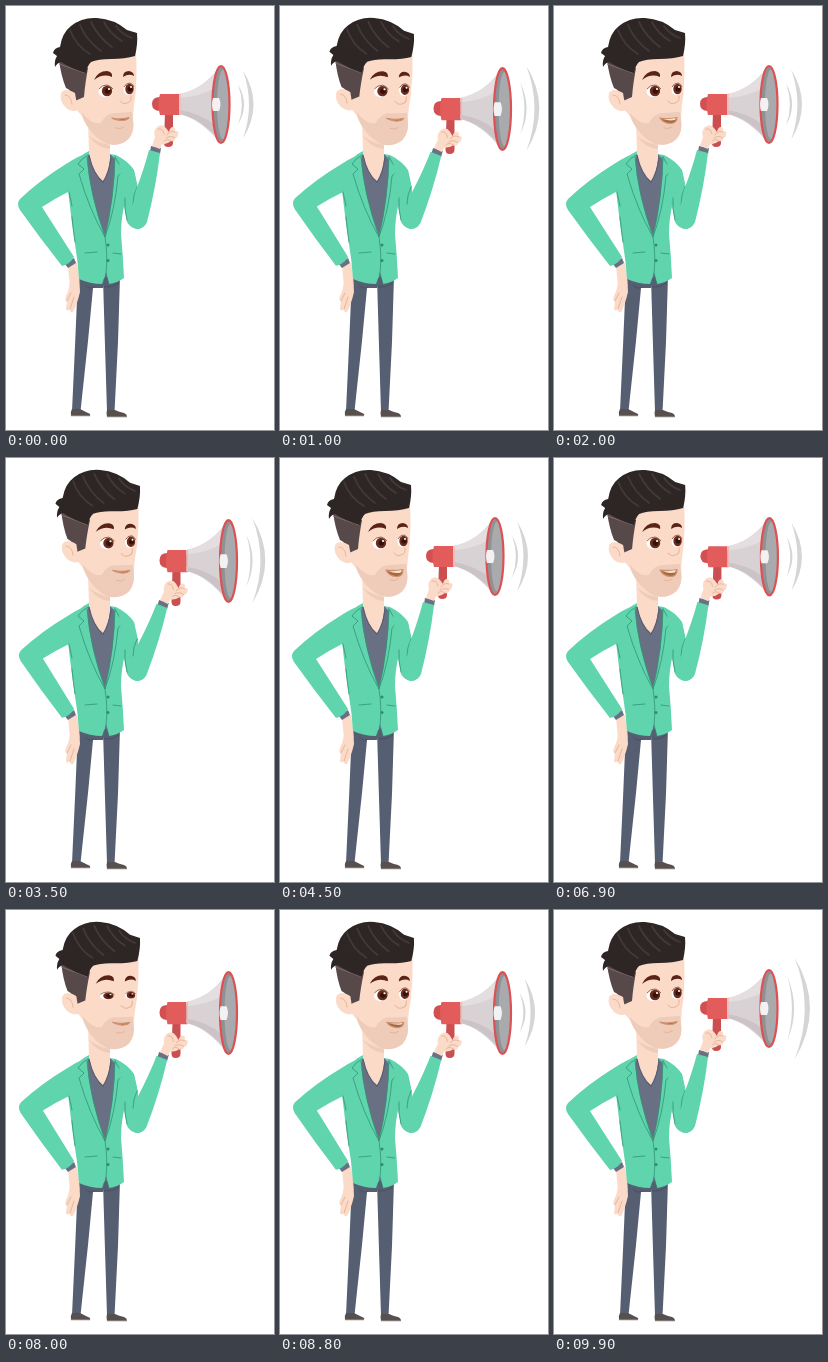
These frames come from a looping animation (268x424 px, 10 s). An HTML page:

```html
<!DOCTYPE html>
<html lang="en">
<head>
<meta charset="utf-8">
<title>Man with a megaphone</title>
<style>
  html, body { margin: 0; height: 100%; overflow: hidden; background: #fff; }
  svg { display: block; width: 100vw; height: 100vh; }
  .skin { fill: #fbdac8; }
  .shade { fill: #efcbb9; }
  .jacket { fill: #5fd4ad; }
  .pants { fill: #565f72; }
  .cuff { fill: #697083; }
  .hair { fill: #2e2525; }
  .red { fill: #e15c5b; }
  .seam { fill: none; stroke: #329576; stroke-width: .8; stroke-linecap: round; stroke-linejoin: round; }
  .fold { fill: none; stroke: #e3ae96; stroke-width: .8; stroke-linecap: round; }
  .strand { fill: none; stroke: #43393a; stroke-width: 1.8; stroke-linecap: round; }
  .brow { fill: #5a2318; }
</style>
</head>
<body>
<svg viewBox="0 0 268 424">
  <!-- legs and shoes -->
  <g class="pants">
    <path d="M72 270L100 272L97 282L87 282L82 335L74.500 405H66L69 340Z"/>
    <path d="M97 272L114 270L112 336L108.500 406H101L99 340Z"/>
  </g>
  <path d="M79 279Q84 284 88 281M98 281Q106 282 113 277" fill="none" stroke="#454d5e" stroke-width=".8"/>
  <g fill="#57504e">
    <path d="M66 403H74Q78 405 82 407Q85 408 84 410H65Q64 406 66 403Z"/>
    <path d="M101 404H109Q113 406 118 407Q121 408 121 411H101Q100 407 101 404Z"/>
  </g>
  <path d="M65 410H84M101 411H121" stroke="#b5b1af" stroke-width=".8"/>

  <!-- hand at the hip -->
  <path class="skin" d="M62 259L71 257Q74 272 74 286Q71 299 67 306Q64 307 64 303Q61 306 60 303L61 295Q58 295 60 290Q65 281 63 271Z"/>
  <path class="fold" d="M64 303L68 291M61 295L65 287"/>

  <g id="hipArm">
    <path class="cuff" d="M59 258L68 252L70 257L62 262Z"/>
    <path class="jacket" d="M84 146Q72 150 60 158Q34 174 14 193Q10 198 14 204Q34 232 56 260Q63 259 68 251Q52 226 36 201Q48 193 62 186L78 176Z"/>
  </g>

  <!-- torso -->
  <path class="jacket" d="M83 145L110 149Q122 155 128 164L132 182L119 196Q115 212 115 228Q117 250 118 272Q111 277 103 278L100 267L96 278Q84 278 73 273Q72 256 69 238Q65 212 62 184L66 162Q72 150 83 145Z"/>
  <path class="cuff" d="M84 146L80 154Q84 190 99 230Q108 198 110 154L104 148Z"/>
  <path class="skin" d="M82 116H104V153Q103 167 97 176Q86 166 83 148Z"/>
  <path class="shade" d="M83 130Q92 137 104 139V143Q91 142 83 130Z"/>
  <path d="M83 149Q87 168 97 176Q103 167 105 152" fill="none" stroke="#565d70" stroke-width="1.2"/>
  <path class="jacket" d="M83 146Q76 150 72 158L78 163L73 168Q82 202 99 231Q83 188 81 149ZM107 149L113 158L118 164L112 170Q109 204 99 231Q109 190 109 150Z"/>
  <path class="seam" d="M82 149Q76 152 72 158L78 163L73 168Q83 203 99 231Q84 188 81 151M109 151L113 158L118 164L112 170Q109 204 99 231Q108 192 109 151M99 231Q102 250 100 267L97 278M100 267L103 278M79 247L91 246M107 247L115 248M63 186L66 200M69 236Q67 222 66 211"/>
  <path d="M97 279L100 267L103 279Z" class="pants"/>
  <g fill="#2e8d70"><circle cx="102" cy="239" r="1.5"/><circle cx="102" cy="254.500" r="1.5"/></g>

  <!-- raised arm -->
  <path class="jacket" d="M113 154Q123 157 128 165L132 184L140 212Q139 222 132 223Q125 223 121 216L117 194Z"/>
  <path class="seam" d="M119 192Q118 202 121 214M131 181Q127 189 127 198"/>
  <g class="forearm">
    <path class="cuff" d="M145 140L155 142L154 148L144 146Z"/>
    <path class="jacket" d="M143 144L154 147Q150 181 141 216Q138 223 131 223Q125 222 124 214L130 184Q138 163 143 144Z"/>
  </g>

  <g id="horn">
    <path d="M159 106H167V137Q167 141 162 141Q158 141 158 137Z" fill="#cb4e50"/>
    <path d="M154 91Q146 91 146 98Q146 105 154 105Z" fill="#d25052"/>
    <path class="red" d="M154 88H174V109H154Q151 98 154 88Z"/>
    <path d="M173 88Q196 85 215 59V138Q195 113 173 108Z" fill="#d9d2d4"/>
    <path d="M173 88Q197 83 214 62L209 82Q193 91 173 92Z" fill="#e4dee0"/>
    <path d="M173 104Q194 107 209 119L214 135Q195 112 173 108Z" fill="#cbc3c7"/>
    <path d="M174 88V109" stroke="#f0b9b8" stroke-width="1.5"/>
    <ellipse cx="215" cy="98.500" rx="8.500" ry="38.500" fill="#8f9194"/>
    <ellipse cx="217" cy="98.500" rx="6" ry="35" fill="#a8aaad"/>
    <ellipse cx="215" cy="98.500" rx="8.500" ry="38.500" fill="none" stroke="#dc5153" stroke-width="2.200"/>
    <path d="M207 92H213Q216 98 213 105H207Q205 98 207 92Z" fill="#f4f1f2"/>
  </g>

  <g class="forearm">
    <path class="skin" d="M146 140L149 131Q147 125 151 121Q156 117 160 122L163 126Q164 121 167 121Q170 122 169 125Q174 125 172 129Q172 132 169 132Q169 136 165 135Q160 139 156 138L154 143Z"/>
    <path class="fold" d="M152 123Q157 122 158 128M161 129Q164 124 169 126M160 132Q165 129 169 132M158 135Q161 132 165 135"/>
  </g>

  <g id="head">
    <path class="skin" d="M76 58L104 47L130 46Q131 66 130 78Q130 88 128 99L127 112Q129 125 123 133Q114 141 101 138Q84 130 76 110L68 101Z"/>
    <path class="shade" d="M76 107Q86 119 95 117Q101 106 110 107L126 106L127 114Q129 126 122 133Q114 141 101 138Q83 129 76 109Z"/>
    <path d="M53 54L82 62Q79 78 78 91L69 95Q66 84 60 82Q55 70 53 54Z" fill="#57484a"/>
    <path d="M53 58L79 67" stroke="#8d726c" stroke-width=".8"/>
    <path class="skin" d="M69 87Q59 81 55 87Q53 95 60 102Q66 107 72 104Z"/>
    <path class="fold" d="M59 89Q65 89 66 98"/>
    <path class="hair" d="M49 61Q48 55 51 50L47 47Q48 42 54 41Q56 27 65 20Q76 11 91 12Q108 13 121 24L131 27Q132 38 129 50Q119 53 105 53Q92 53 85 56Q81 60 80 67Q66 63 55 56Q51 57 49 61Z"/>
    <path class="strand" d="M64 24Q70 40 84 48M74 19Q80 34 95 45M85 16Q92 31 106 41M98 16Q104 28 116 35M110 20Q115 28 126 32"/>
    <path class="brow" d="M88 74Q92 65 101 65Q107 66 106 71Q97 67 88 74ZM117 71Q117 65 123 65Q128 66 128 70Q123 67 117 71Z"/>
    <g id="eyes">
      <ellipse cx="99.500" cy="85.500" rx="7" ry="5.700" fill="#fff"/>
      <ellipse cx="122.500" cy="83.500" rx="5" ry="5.700" fill="#fff"/>
      <g fill="#6b2a1c"><circle cx="101" cy="85" r="5.200"/><ellipse cx="123.500" cy="83" rx="4.200" ry="5.200"/></g>
      <g fill="#30120e"><circle cx="101.500" cy="85" r="2.800"/><circle cx="124" cy="83" r="2.500"/></g>
      <g fill="#fff"><circle cx="103" cy="83" r="1.100"/><circle cx="125" cy="81" r="1"/></g>
      <path d="M93 83Q96 79 101 79Q105 80 107 83M118 81Q120 77 124 77Q127 78 128 81" fill="none" stroke="#7a4434" stroke-width=".8"/>
    </g>
    <path d="M114 95Q117 99 121 97Q126 96 125 90" fill="none" stroke="#e8b39c" stroke-width="1" stroke-linecap="round"/>
    <path id="mouth" fill="#a8683f" stroke="#cf9270" stroke-width="1.200" stroke-linejoin="round"/>
    <path id="teeth" fill="#f6e3d0"/>
    <path class="fold" d="M110 122Q114 124 118 121"/>
  </g>

  <path id="waves" fill="#d3d5d7"/>
</svg>
<script>
const $ = id => document.getElementById(id);
const forearms = document.querySelectorAll('.forearm');
const LOOP = 10000, SWING = 2500, PULSE = 625;

function smooth(a, b, x) {
  const u = Math.min(1, Math.max(0, (x - a) / (b - a)));
  return u * u * (3 - 2 * u);
}

// A crescent bulging right from two tips; x values are along the stage.
function crescent(tip, right, cy, half, thick) {
  const outer = 2 * right - tip;
  return `M${tip} ${cy - half}Q${outer} ${cy} ${tip} ${cy + half}` +
         `Q${outer - 2 * thick} ${cy} ${tip} ${cy - half}Z`;
}

function draw(t) {
  const p = t % SWING;
  const away = smooth(0, 500, p) - smooth(1300, 2000, p);

  $('head').setAttribute('transform', `rotate(${1.5 * away} 95 140)`);
  $('hipArm').setAttribute('transform', `rotate(${0.9 * away} 66 256)`);
  $('horn').setAttribute('transform',
    `translate(${7.5 * away} ${4.5 * away}) translate(0 98) scale(1 ${1 + 0.06 * away}) translate(0 -98)`);
  for (const arm of forearms) arm.setAttribute('transform', `rotate(${6.5 * away} 132 212)`);

  const open = 1 - 0.35 * Math.max(0, 1 - Math.abs(t - 8000) / 200);
  $('eyes').setAttribute('transform', `translate(0 87) scale(1 ${open}) translate(0 -87)`);

  const talking = p >= 1300 && p <= 2300;
  const gape = talking ? Math.abs(Math.cos(Math.PI * (t - 4500) / 590)) : 0;
  $('mouth').setAttribute('d',
    `M106 112Q115 ${114 - gape} 123 111.5Q${122 + gape} ${114 + 5 * gape} 116 ${114.5 + 4 * gape}Q109 ${114 + 4 * gape} 106 112Z`);
  $('teeth').setAttribute('d', gape > 0.2 ? `M108 113Q116 113.5 122 112L121 ${112.5 + 2 * gape}Q115 ${113 + 3 * gape} 108 113Z` : '');

  const sounding = p < 300 || p >= 950;
  const grow = (t % PULSE / PULSE) ** 2;
  const rim = 215 + 7.5 * away, cy = 98.5 + 4 * away;
  $('waves').setAttribute('d', !sounding ? '' :
    crescent(rim + 22 + 5 * grow, rim + 32.5 + 12 * grow, cy, 34 + 24 * grow, 4.5 + grow) +
    crescent(rim + 17 + 2 * grow, rim + 23 + 3 * grow, cy, 20 + 17 * grow, 2.2));
}

const start = performance.now();
function tick() {
  const t = (performance.now() - start) % LOOP;
  draw(Math.floor(t / 100) * 100);
  requestAnimationFrame(tick);
}
tick();
</script>
</body>
</html>
```
